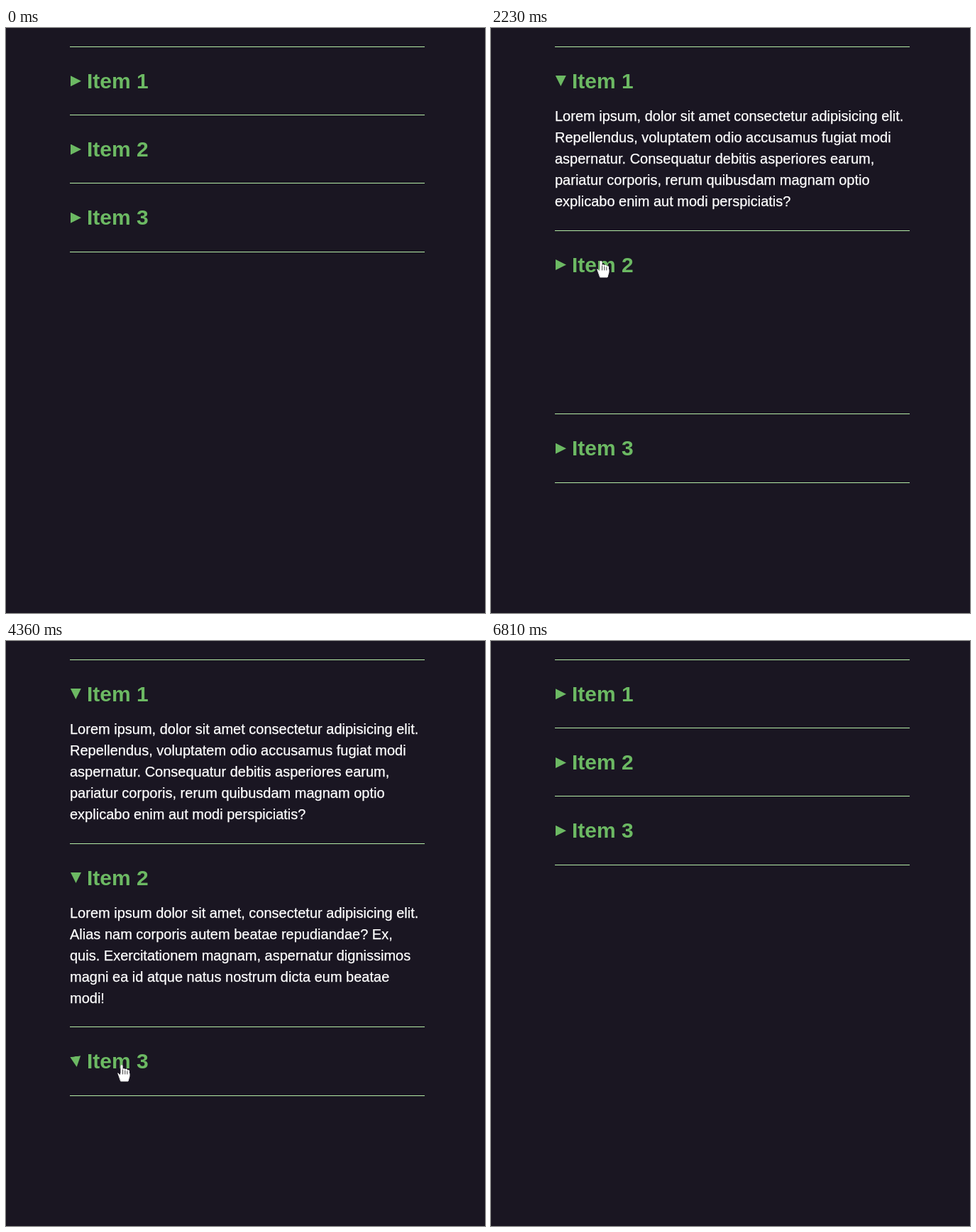
An HTML page that plays this animation: 675x824 px, repeating every 7630 ms.

```html
<!DOCTYPE html>
<html lang="en">
<head>
<meta charset="utf-8">
<title>Accordion</title>
<style>
  html, body { margin: 0; width: 100%; height: 100%; overflow: hidden; background: #1a1622; }
  body { position: relative; font-family: "Liberation Sans", Arial, sans-serif; }
  body * { position: absolute; margin: 0; white-space: pre; }
  .line { left: 90px; width: 500px; height: 1px; background: #b4eba6; }
  .mark { left: 91px; width: 15px; height: 15px; background: #6cb963; clip-path: polygon(0 0, 100% 50%, 0 100%); }
  h2 { left: 114px; font-size: 30px; line-height: 45px; color: #6cb963; }
  p { left: 90px; font-size: 20px; line-height: 30px; color: #fff; -webkit-text-stroke: .25px #fff; }
  svg { left: 0; top: 0; width: 20px; height: 26px; overflow: visible; filter: drop-shadow(0 0 .7px #000); }
</style>
</head>
<body>
<svg id="cursor" fill="#fff">
  <path id="arrow" d="M0 0V17L4 13L6.5 19L9 18L6.5 12H12Z"/>
  <g id="hand" stroke-linecap="round">
    <path d="M-5 12L-1.5 15V12H11V16L9 23H-1Z" stroke="#fff" stroke-linejoin="round"/>
    <path d="M0 1.5V14M3.2 6.5V14M6.4 7V14M9.4 8.5V14" stroke="#fff" stroke-width="3.2"/>
    <path d="M1.6 7V13M4.8 8V13M7.9 9V13" stroke="#000" stroke-width=".8"/>
  </g>
</svg>
<script>
const LOOP = 7630, FADE = 500, TOP = 26.2, SHUT = 96.3, WIDE = 258.8;

const items = [
  { open: 1120, close: 5230, text: `Lorem ipsum, dolor sit amet consectetur adipisicing elit.
Repellendus, voluptatem odio accusamus fugiat modi
aspernatur. Consequatur debitis asperiores earum,
pariatur corporis, rerum quibusdam magnam optio
explicabo enim aut modi perspiciatis?` },
  { open: 2230, close: 6010, text: `Lorem ipsum dolor sit amet, consectetur adipisicing elit.
Alias nam corporis autem beatae repudiandae? Ex,
quis. Exercitationem magnam, aspernatur dignissimos
magni ea id atque natus nostrum dicta eum beatae
modi!` },
  { open: 3200, close: 4260, text: `Lorem ipsum dolor sit amet consectetur adipisicing elit.
Eveniet harum quaerat, dolorum nemo tempora fugit
repellat sapiente officia, minima eaque ducimus quas
voluptates in error cumque laborum itaque sunt, at
perferendis culpa?` }
];

// Where the pointer rests, and from when to when
const rests = [
  { from: 30, to: 30, x: 620, y: 775 },
  { from: 780, to: 800, x: 126, y: 102 },
  { from: 970, to: 1300, x: 149, y: 82 },
  { from: 2080, to: 2330, x: 155, y: 328 },
  { from: 3170, to: 3700, x: 145, y: 600 },
  { from: 4330, to: 4400, x: 163, y: 597 },
  { from: 4980, to: 5390, x: 170, y: 65 },
  { from: 5920, to: 6250, x: 170, y: 158 },
  { from: 6750, to: 6810, x: 604, y: 817 }
];

const cursor = document.getElementById("cursor");
const arrow = document.getElementById("arrow");
const hand = document.getElementById("hand");

function add(tag, className = "", text = "") {
  const el = document.createElement(tag);
  el.className = className;
  el.textContent = text;
  document.body.insertBefore(el, cursor);
  return el;
}

items.forEach((item, i) => {
  item.line = add("div", "line");
  item.mark = add("div", "mark");
  item.head = add("h2", "", "Item " + (i + 1));
  item.body = add("p", "", item.text);
});
const lastLine = add("div", "line");

const clamp = v => Math.min(1, Math.max(0, v));
const smooth = v => v * v * (3 - 2 * v);
const mix = (a, b, k) => Math.round(a + (b - a) * k);

// cubic-bezier(.42, 0, .58, 1), solved by bisection
function easeInOut(x) {
  let lo = 0, hi = 1;
  for (let i = 0; i < 20; i++) {
    const t = (lo + hi) / 2, u = 1 - t;
    if (3 * u * u * t * .42 + 3 * u * t * t * .58 + t ** 3 < x) lo = t; else hi = t;
  }
  return smooth(lo);
}

const progress = (now, start) => easeInOut(clamp((now - start) / FADE));

// Quick start, long settling into each rest
function pointer(now) {
  const i = Math.max(1, rests.findLastIndex(r => now >= r.to) + 1);
  const a = rests[i - 1], b = rests[i] || a;
  const v = clamp((now - a.to) / (b.from - a.to));
  const k = smooth(1 - (1 - v) ** 2);
  return [mix(a.x, b.x, k), mix(a.y, b.y, k)];
}

const setTop = (el, y) => el.style.top = y + "px";
const show = (el, on) => el.style.display = on ? "" : "none";

function draw(now) {
  const [px, py] = pointer(now);
  let y = TOP, hover = false;
  for (const item of items) {
    const top = Math.floor(y);
    const isOpen = now >= item.open && now < item.close;
    const shown = progress(now, item.open);
    const turn = 90 * (shown - progress(now, item.close));
    setTop(item.line, top);
    setTop(item.head, top + 26);
    setTop(item.mark, y + 41);
    item.mark.style.transform = `rotate(${turn}deg)`;
    setTop(item.body, Math.round(y + 83.1));
    item.body.style.opacity = isOpen ? shown : 0;
    item.body.style.transform = `translateY(${-25 * (1 - shown)}px)`;
    hover ||= px >= 90 && px < 590 && py >= top + 26 && py < top + 71;
    y += isOpen ? WIDE : SHUT;
  }
  setTop(lastLine, Math.floor(y));

  show(cursor, now >= rests[0].from && now < rests.at(-1).to);
  show(hand, hover);
  show(arrow, !hover);
  cursor.style.transform = `translate(${px}px, ${py}px)`;
}

const began = performance.now();
function tick() {
  draw((performance.now() - began) % LOOP);
  requestAnimationFrame(tick);
}
tick();
</script>
</body>
</html>
```
